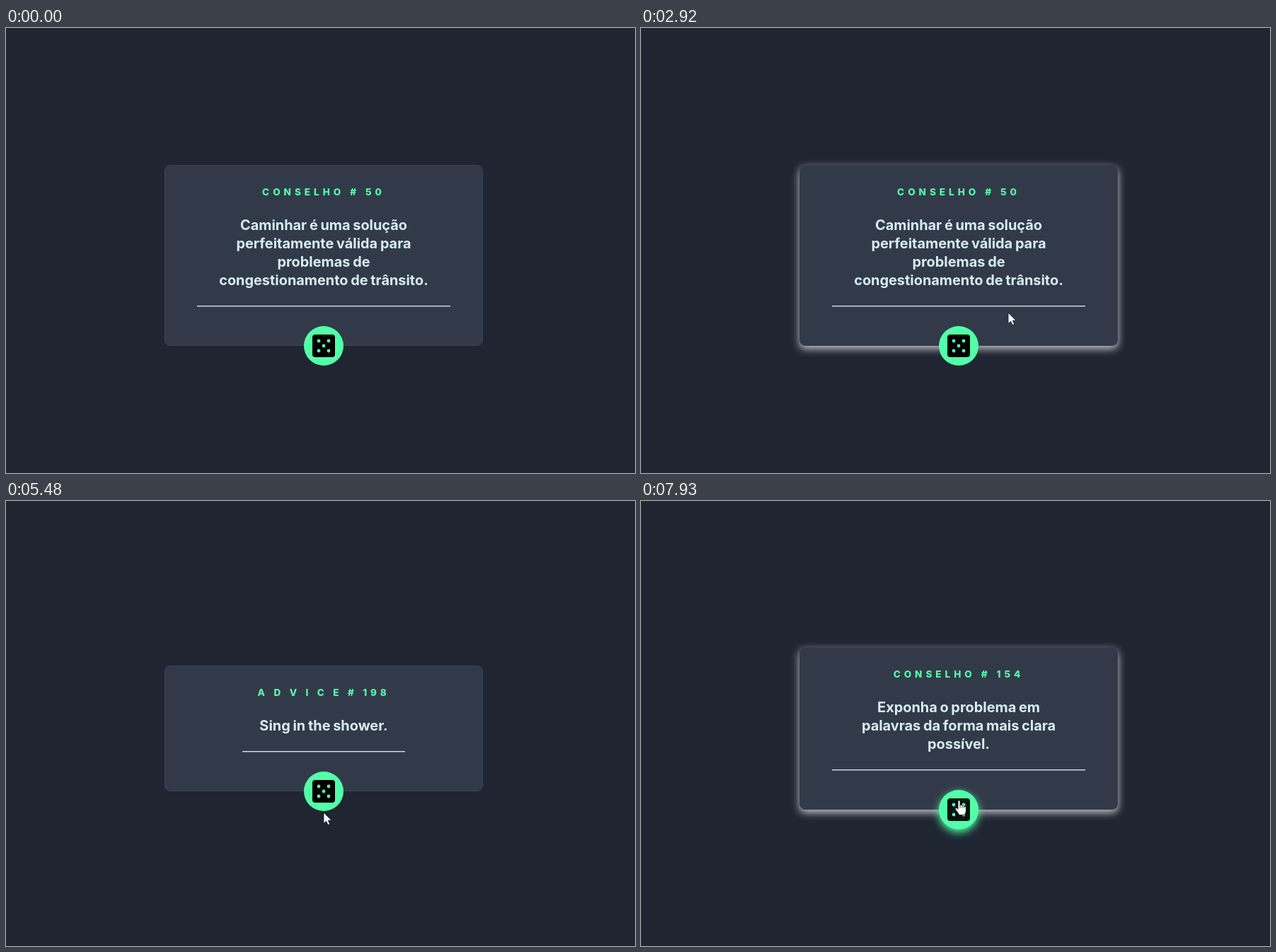
An HTML page for the animation above (8 s loop, 889 by 630 pixels).

```html
<!DOCTYPE html>
<html lang="pt">
<head>
<meta charset="utf-8">
<title>Conselhos</title>
<style>
  html, body { margin: 0; width: 100%; height: 100%; overflow: hidden; background: #1f2632; }
  body { position: relative; font-family: Inter, sans-serif; text-align: center; }
  #card { position: absolute; left: 224px; top: 322px; width: 450px; box-sizing: border-box;
    transform: translateY(-50%); border: 1px solid #3b4453; border-radius: 8px; background: #323a49; }
  #card.glow { border-color: #363e4d; box-shadow: 0 4px 12px rgba(255, 255, 255, .75); }
  h1, p { position: absolute; left: 0; right: 0; margin: 0; white-space: pre-line; }
  h1 { top: 27px; font-size: 13.5px; line-height: 20px; font-weight: 800; color: #52ffa8; }
  p { top: 71px; font-size: 19.9px; line-height: 26px; font-weight: 700; word-spacing: -1px; color: #d6edf3; }
  #rule { position: absolute; left: 50%; bottom: 54px; height: 2px; transform: translateX(-50%);
    background: linear-gradient(#cee3e9 50%, #cee3e966 50%); }
  #button { position: absolute; left: 196px; bottom: -29px; width: 56px; height: 56px; border-radius: 50%; background: #52ffa8; }
  #button.glow { box-shadow: 0 4px 12px #52ffa8; }
  #button.glow svg { opacity: .92; }
  svg { position: absolute; left: 0; top: 0; overflow: visible; }
  #click { position: absolute; left: 0; top: 0; width: 22px; height: 22px; margin: -11px; border-radius: 50%; background: rgba(255, 235, 0, .5); }
</style>
</head>
<body>
<div id="card">
  <h1 id="title"></h1>
  <p id="text"></p>
  <div id="rule"></div>
  <div id="button">
    <svg width="56" height="56">
      <rect x="12" y="12" width="32" height="32" rx="4"/>
      <g id="pips" fill="#52ffa8"></g>
    </svg>
  </div>
</div>
<div id="click"></div>
<svg id="pointer" width="24" height="24" fill="#fff" stroke="#111" stroke-width=".8" stroke-linejoin="round">
  <path id="arrow" d="M0 0V15.6L3.6 12.3 6 17.6 8.7 16.4 6.3 11.2H11Z"/>
  <g id="hand">
    <path d="M-1 1.6C-1 -.4 2 -.4 2 1.6V7C2.6 5.7 5 6 5 7.6C5.8 6.6 7.8 7 7.8 8.6C8.8 7.8 10.4 8.4 10.4 10V14.5C10.4 17 8.8 18 8.8 20.5H.6C.4 18-4.6 14.2-4.8 11.8C-4.9 10.2-2.8 9.8-1 12.4Z"/>
    <path d="M2 7V10.5M5 7.6V10.8M7.8 8.6V11" fill="none"/>
  </g>
</svg>
<script>
  const LOOP = 8000, STEP = 70;
  const $ = id => document.getElementById(id);

  // start, title, letter spacing, rule width, text
  const slips = [
    [0, 'CONSELHO # 50', 5, 358, 'Caminhar é uma solução\nperfeitamente válida para\nproblemas de\ncongestionamento de trânsito.'],
    [5480, 'A D V I C E # 198', 4.75, 230, 'Sing in the shower.'],
    [5610, 'CONSELHO # 198', 5, 237, 'Cantar no chuveiro.'],
    [7800, 'A D V I C E # 154', 4.75, 358, 'State the problem in words as\nclearly as possible.'],
    [7930, 'CONSELHO # 154', 5, 358, 'Exponha o problema em\npalavras da forma mais clara\npossível.']
  ];

  // time, x, y of the pointer tip
  const path = [
    [380, 719, 476], [1080, 478, 461], [1150, 473, 463], [1210, 473, 463], [1280, 471, 463],
    [1330, 469, 463], [1480, 469, 463], [1830, 684, 529], [1960, 684, 529], [2380, 593, 430],
    [2640, 593, 430], [2920, 519, 403], [3410, 449, 441], [5800, 449, 441], [6150, 449, 424],
    [LOOP, 449, 424]
  ];
  const clicks = [[4600, 4670], [7340, 7470]];

  for (const [x, y] of [[21, 21], [35, 21], [28, 28], [21, 35], [35, 35]])
    $('pips').innerHTML += `<circle cx="${x}" cy="${y}" r="2.4"/>`;

  function pointerAt(t) {
    const i = path.findIndex(k => k[0] > t);
    const [t0, x0, y0] = path[i - 1], [t1, x1, y1] = path[i];
    const p = Math.floor((t - t0) / STEP) * STEP / (t1 - t0);
    const e = p * (2 - p);
    return [x0 + (x1 - x0) * e, y0 + (y1 - y0) * e];
  }

  const show = (id, on) => $(id).style.visibility = on ? 'visible' : 'hidden';

  let current;
  function setSlip(slip) {
    if (slip === current) return;
    current = slip;
    const [, title, spacing, width, text] = slip;
    $('title').textContent = title;
    $('title').style.letterSpacing = spacing + 'px';
    $('text').textContent = text;
    $('rule').style.width = width + 'px';
    $('card').style.height = 152 + 26 * text.split('\n').length + 'px';
  }

  function draw(t) {
    setSlip(slips.findLast(s => s[0] <= t));
    const visible = t >= path[0][0];
    const [x, y] = visible ? pointerAt(t) : [-99, -99];
    const half = $('card').offsetHeight / 2;
    const onButton = Math.hypot(x - 449, y - 322 - half) < 28;
    const onCard = onButton || Math.abs(x - 449) < 225 && Math.abs(y - 322) < half;
    $('card').classList.toggle('glow', onCard);
    $('button').classList.toggle('glow', onButton);
    show('arrow', visible && !onButton);
    show('hand', visible && onButton);
    show('click', clicks.some(([a, b]) => t >= a && t < b));
    for (const id of ['pointer', 'click'])
      $(id).style.transform = `translate(${x}px, ${y}px)`;
  }

  const start = performance.now();
  function tick() {
    draw((performance.now() - start) % LOOP);
    requestAnimationFrame(tick);
  }
  tick();
</script>
</body>
</html>
```
